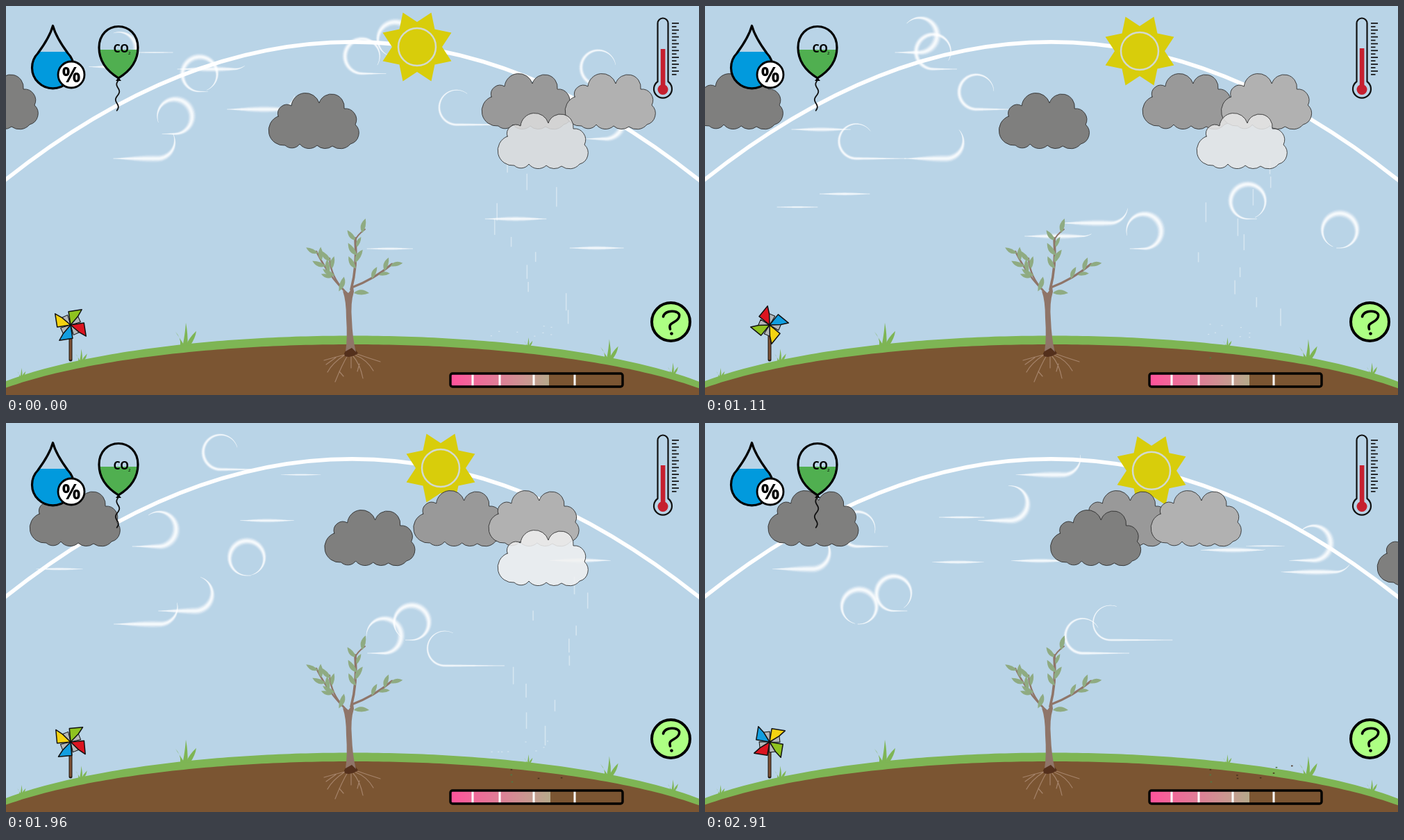
Recreate the animation shown at these times as an HTML page with a canvas. Size 998 by 561 pixels, loop 2990 ms.

```html
<!DOCTYPE html>
<html lang="en">
<head>
<meta charset="utf-8">
<title>Young tree</title>
<style>
html, body { margin: 0; width: 100%; height: 100%; overflow: hidden; background: #b9d4e7; }
canvas { display: block; width: 998px; height: 561px; }
</style>
</head>
<body>
<canvas id="stage" width="998" height="561"></canvas>
<script>
const c = document.getElementById('stage').getContext('2d');
const TAU = Math.PI * 2, LOOP = 2990, STEPS = 38, STEP = LOOP / STEPS;
const SKY = '#b9d4e7', GRASS = '#7eb554', SOIL = '#7b5532', BARK = '#8f7569', LEAF = '#8fab82';

const lerp = (a, b, k) => a + (b - a) * k;
const polar = (r, a) => [r * Math.cos(a), r * Math.sin(a)];
const rand = n => { const v = Math.sin(n * 127.1 + 3.7) * 43758.5453; return v - Math.floor(v); };

function paint(path, color, line, width) {
  if (color) {
    c.fillStyle = color;
    c.fill(path);
  }
  if (line) {
    c.strokeStyle = line;
    c.lineWidth = width;
    c.stroke(path);
  }
}
const draw = (d, ...style) => paint(new Path2D(d), ...style);

function disc(x, y, r, ...style) {
  const p = new Path2D();
  p.arc(x, y, r, 0, TAU);
  paint(p, ...style);
}
function poly(points, ...style) {
  const p = new Path2D();
  points.forEach(([x, y]) => p.lineTo(x, y));
  p.closePath();
  paint(p, ...style);
}
function at(x, y, angle, scene) {
  c.save();
  c.translate(x, y);
  c.rotate(angle);
  scene();
  c.restore();
}

// Sky
const arcY = x => 52 + 198 * ((x - 498) / 499) ** 2;

function sky() {
  c.fillStyle = SKY;
  c.fillRect(0, 0, 998, 561);
  draw('M-1 250.8Q498 -146.8 997 250L1003 255', null, '#fff', 5.5);
}

// The sun hops along the arc once a second
function sun(t) {
  const x = 592 + 17 * Math.floor(t + 0.925), rays = [];
  for (let i = 0; i < 16; i++) rays.push(polar(i % 2 ? 53.5 : 36, i * TAU / 16));
  at(x, arcY(x), 0, () => {
    poly(rays, '#d8cd0b');
    disc(0, 0, 27, null, '#d2d9cf', 2.5);
  });
}

// Gusts run along a base line, loop once and run on
const R = 25, TURN = TAU * R;
const gusts = [[218, 220], [391, 149], [329, 91], [782, 307], [914, 349], [632, 350], [309, 67],
  [347, 220], [584, 313], [544, 332], [220, 178], [272, 271], [222, 290]]
  .map(([x, y], i) => ({ x, y, birth: -0.7 + 0.08 * i + 0.005 * i * i }));
for (let i = 0; i < 18; i++) {
  gusts.push({
    x: 150 + 850 * rand(i + 40),
    y: 70 + 170 * rand(i + 80),
    birth: i < 8 ? -1.5 + 0.09 * i : 0.1 + 0.16 * i
  });
}

function gustPoint(s, x, y) {
  if (s < 0) return [x + s, y, 0];
  if (s > TURN) return [x + s - TURN, y, 0];
  const a = s / R;
  return [x + R * Math.sin(a), y - R + R * Math.cos(a), a];
}

function ribbon(x, y, mid, half, width, alpha) {
  const near = [], far = [], n = 56;
  for (let i = 0; i <= n; i++) {
    const k = i / n;
    const [px, py, a] = gustPoint(mid + half * (2 * k - 1), x, y);
    const w = width / 2 * Math.sin(Math.PI * k) ** 1.3 + 0.15;
    near.push([px + w * Math.sin(a), py + w * Math.cos(a)]);
    far.unshift([px - w * Math.sin(a), py - w * Math.cos(a)]);
  }
  poly(near.concat(far), `rgba(255,255,255,${alpha})`);
}

function gust({ x, y, birth }, t) {
  const life = birth < 0 ? 2.4 + 0.5 * birth : 2.75 + 0.3 * birth;
  const p = (t - birth) / life;
  if (p < 0 || p > 1) return;
  const mid = -100 + 275 * p, half = 25 + 110 * p - 45 * p * p;
  const w = 1 + 9 * Math.sin(Math.PI * p);
  for (const k of [1.3, 1, 0.75, 0.5, 0.25]) ribbon(x, y, mid, half, w * k, 0.1 + 0.35 * (1.3 - k));
}

// Clouds
const puff = new Path2D('M14 31A13 13 0 0 1 33 16A20.5 20.5 0 0 1 73 12A18.5 18.5 0 0 1 109 20' +
  'A16 16 0 0 1 125 43A16.5 16.5 0 0 1 118 71A19 19 0 0 1 92 74A17 17 0 0 1 70 73' +
  'A17 17 0 0 1 45 71A14 14 0 0 1 24 73A21.8 21.8 0 0 1 14 31Z');
const RAIN_END = 2.72;

function cloud(x, y, color) {
  at(x, y, 0, () => paint(puff, color, 'rgba(40,40,40,.85)', 1));
}

function clouds(t) {
  cloud(685 - 50 * t, 100, '#999');
  cloud(378 + 41 * t, 128, '#7f7f7e');
  cloud(-84 + 60 * t, 100, '#7f7f7e');
  cloud(805 - 56 * t, 100, '#b1b1b1');
  if (t < RAIN_END) {
    const g = Math.round(lerp(221, 247, t / 2.6));
    cloud(708, 157, `rgba(${g},${g},${g},.85)`);
  } else {
    cloud(968 + 50 * (2.91 - t), 157, '#7f7f7e');
  }
}

function rain(t) {
  if (t >= RAIN_END) return;
  c.fillStyle = 'rgba(255,255,255,.4)';
  for (let i = 0; i < 11; i++) {
    const fall = i / 11 + 1.9 * t, cycle = Math.floor(fall);
    const x = 702 + 142 * rand(i * 7 + cycle), len = 14 + 18 * rand(i);
    c.fillRect(x - 0.8, 232 + 238 * (fall - cycle) - len / 2, 1.6, len);
  }
  for (let i = 0; i < 8; i++) {
    const n = i * 13 + Math.floor(t * 6) * 3;
    c.fillRect(695 + 100 * rand(n), 458 + 20 * rand(n + 1), 2.2, 1.2);
  }
}

// Ground and plants
const hillY = (x, top, h) => top + h * (1 - Math.sqrt(1 - ((x - 498) / 590) ** 2));

function hill(top, h, color) {
  const edge = [[998, 561], [0, 561]];
  for (let x = 0; x <= 1000; x += 8) edge.push([x, hillY(x, top, h)]);
  poly(edge, color);
}

function blade(x, y, dx, dy, w) {
  const tip = `${x + dx} ${y + dy}`;
  draw(`M${x - w / 2} ${y}Q${x + dx * 0.15} ${y + dy * 0.55} ${tip}` +
    `Q${x + dx * 0.65 + w / 2} ${y + dy * 0.5} ${x + w / 2} ${y}Z`, GRASS);
}

function tuft(x, size) {
  const y = hillY(x, 475.5, 141) + 2;
  blade(x - 4 * size, y, -10 * size, -20 * size, 6 * size);
  blade(x, y, 1 * size, -33 * size, 7 * size);
  blade(x + 4 * size, y, 12 * size, -21 * size, 6 * size);
}

function ground(t) {
  hill(475.5, 141, GRASS);
  hill(488, 135, SOIL);
  [[22, 0.4], [108, 0.55], [258, 1], [752, 0.4], [868, 0.85], [960, 0.5]].forEach(p => tuft(...p));
  for (let i = 0; i < 9; i++) {
    if (t < 0.3 + 2.5 * Math.sqrt(i / 9)) continue;
    c.fillStyle = i % 3 ? '#4a321f' : '#4f7a45';
    c.fillRect(725 + 120 * rand(i + 5), 490 + 27 * rand(i + 9), 2.5, 1.6);
  }
}

// Each branch: start, bend, end, thickness
const branches = [
  [492, 415, 466, 392, 447, 354, 2.6],
  [487, 410, 468, 391, 466, 364, 2.4],
  [497, 409, 506, 375, 503, 335, 3.6],
  [503, 338, 505, 331, 517, 322, 2],
  [498, 406, 530, 394, 556, 372, 3]
];

function leaf(x, y, angle, len) {
  const h = len / 2;
  at(x, y, angle, () => draw(`M${-h} 1Q${-h * 0.2} ${-len * 0.42} ${h} -1Q0 ${len * 0.22} ${-h} 1Z`, LEAF));
}

function branch([x0, y0, bx, by, x1, y1, w], seed) {
  draw(`M${x0} ${y0}Q${bx} ${by} ${x1} ${y1}`, null, BARK, w);
  const n = Math.round(Math.hypot(x1 - x0, y1 - y0) / 15);
  for (let j = 0; j < n; j++) {
    const k = lerp(0.35, 1, (j + 0.7) / n), side = j % 2 ? 1 : -1;
    const x = lerp(lerp(x0, bx, k), lerp(bx, x1, k), k);
    const y = lerp(lerp(y0, by, k), lerp(by, y1, k), k);
    const dir = Math.atan2(lerp(by - y0, y1 - by, k), lerp(bx - x0, x1 - bx, k)) + side * 0.55;
    leaf(x + 9 * Math.cos(dir), y + 9 * Math.sin(dir), dir, 16 + 6 * rand(seed * 9 + j));
  }
}

function tree() {
  draw('M492 502Q475 506 458 511M488 503Q470 515 463 528M492 504Q484 517 474 542' +
    'M497 505L497 522M499 504Q510 516 514 537M502 503Q520 510 529 526M503 501Q520 507 539 513' +
    'M475 507L461 517M480 527L486 534M509 516L506 527', null, '#a5836a', 1.2);
  draw('M487 501Q490 493 497 492Q504 495 507 501Q497 508 488 505Z', '#54301c');
  draw('M489 498Q492 480 490 450Q490 425 485 411L493 414L500 405L501 412Q496 428 498 452Q499 480 504 499L498 493Z', BARK);
  branches.forEach(branch);
  leaf(483, 401, 2, 22);
  leaf(512, 414, 0.1, 22);
}

function pinwheel(t) {
  draw('M93 460V510', null, '#251a12', 5);
  draw('M93 461V509', null, '#7d5236', 2.8);
  const turn = (216 + 235 * t - 25.5 * t * t) * Math.PI / 180;
  ['#f5d311', '#8fc31f', '#dc1420', '#129ee0'].forEach((color, i) => at(93, 460, turn + i * TAU / 4, () => {
    poly([[0, 0], polar(17, 0), polar(15, 0.65)], '#b5b8ba', '#111', 1);
    poly([[0, 0], polar(19.5, -0.78), polar(27.5, 0), polar(16, 0.08)], color, '#111', 1.5);
  }));
}

// Instruments
function text(s, x, y, font) {
  c.fillStyle = '#000';
  c.font = font + ' "Noto Sans", "Open Sans", sans-serif';
  c.fillText(s, x, y);
}

function vessel(d, level, color) {
  const p = new Path2D(d);
  c.save();
  c.clip(p);
  c.fillStyle = color;
  c.fillRect(0, level, 250, 100);
  c.restore();
  paint(p, null, '#000', 3.2);
}

function humidity() {
  vessel('M67.5 28.5Q72 45 89 68A30 30 0 1 1 46 68Q63 45 67.5 28.5Z', 66, '#019add');
  disc(94, 99, 19, '#fff', '#000', 2.8);
  c.textAlign = 'center';
  text('%', 94, 109.5, '600 30px');
}

function balloon() {
  vessel('M162 104C149 96 134 82 134 60C134 41 147 29.5 162 29.5C177 29.5 190 41 190 60C190 82 175 96 162 104Z', 63, '#50af50');
  draw('M162 103L158 108H166Z', '#000');
  const string = new Path2D();
  for (let k = 0; k <= 1; k += 0.05) string.lineTo(162 - 3 * k + 2.4 * Math.sin(-k * 13), 107 + 46 * k);
  paint(string, null, '#111', 1.8);
  c.textAlign = 'left';
  text('CO', 154.5, 67, '600 16px');
  text('2', 176, 69.5, '500 6px');
}

function thermometer(t) {
  draw('M938.5 109V25A7.5 7.5 0 0 1 953.5 25V109A13 13 0 1 1 938.5 109Z', SKY, '#111', 2.2);
  c.fillStyle = '#c6202f';
  c.fillRect(942.8, t < 1.1 ? 62 : 61, 6.6, 55);
  disc(946, 120.5, 7.5, '#c6202f');
  c.fillStyle = '#111';
  for (let i = 0; i < 16; i++) c.fillRect(959, 24 + i * 4.93, i % 2 ? 6.5 : 10, 1.7);
}

function help() {
  disc(957.5, 455.5, 27.5, '#adff83', '#000', 4);
  draw('M946.5 448C948 441 958 438.5 966 441.5C973 445 969 452 962.5 455.5C956 459 955 461 956.5 466', null, '#000', 3.6);
  disc(958.5, 472.5, 2.3, '#000');
}

function meter(t) {
  const g = c.createLinearGradient(641, 0, 784, 0);
  ['#ff529b', '#ef6a99', '#dd7f96', '#cb9691', '#b6aa8b'].forEach((color, i) => g.addColorStop(i / 4, color));
  c.fillStyle = g;
  c.fillRect(641, 531, t < 1.1 ? 141 : 143, 17);
  c.fillStyle = '#fff';
  for (const x of [672, 711, 760, 819]) c.fillRect(x - 1.5, 531, 3, 17);
  const frame = new Path2D();
  frame.roundRect(640, 530, 248, 19, 3);
  paint(frame, null, '#000', 3.4);
}

function render(t) {
  c.lineJoin = c.lineCap = 'round';
  sky();
  gusts.forEach(g => gust(g, t));
  sun(t);
  rain(t);
  clouds(t);
  ground(t);
  tree();
  pinwheel(t);
  humidity();
  balloon();
  thermometer(t);
  help();
  meter(t);
}

const start = performance.now();
function tick() {
  const ms = (performance.now() - start) % LOOP;
  const step = Math.min(STEPS - 1, Math.floor((ms + 20) / STEP));
  render(step * STEP / 1000);
  requestAnimationFrame(tick);
}
tick();
</script>
</body>
</html>
```
